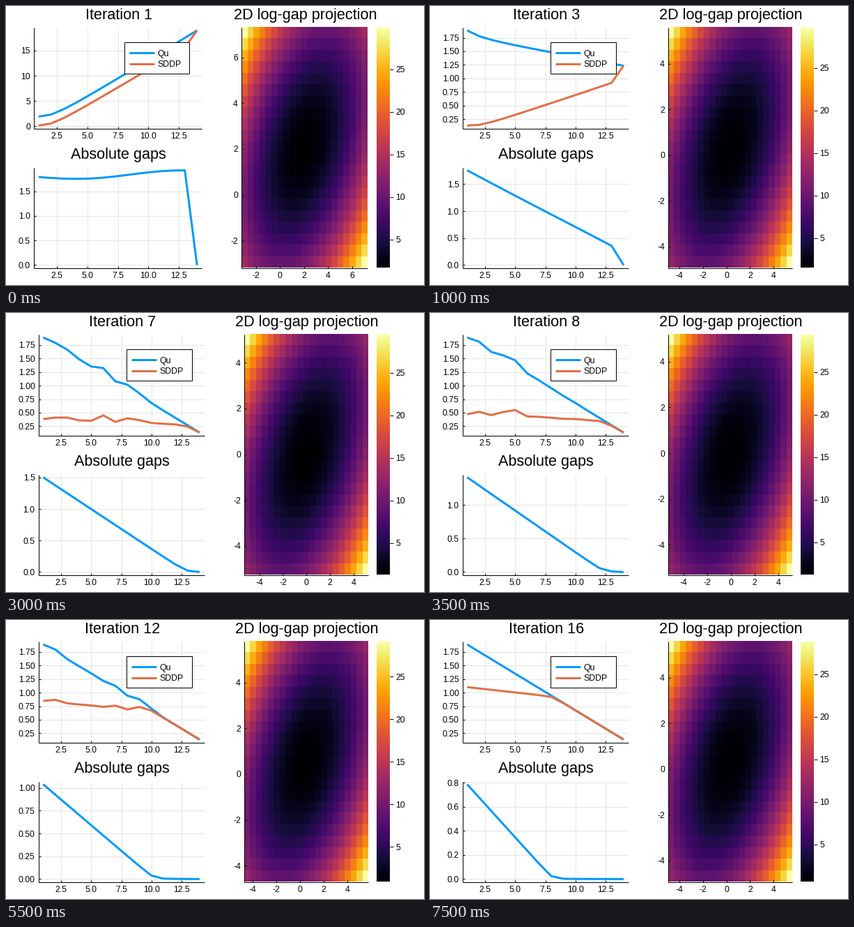
Animation, 600 px wide and 400 px high, one loop 8 s. Source, as a matplotlib script:

```python
import numpy as np
import matplotlib.pyplot as plt
from matplotlib.animation import FuncAnimation
from matplotlib.patches import Rectangle

W, H, DPI = 600, 400, 100
PX = 72 / DPI
BLUE, ORANGE, GRID = "#009af9", "#e26f46", "#e4e4e4"
plt.rcParams["font.family"] = "Liberation Sans"

ITERATIONS = 16
STAGES = np.arange(1, 15)
STEPS = STAGES - 1
BAR_SPAN = 28.2
GX, GY = np.meshgrid(np.linspace(-5, 5, 21), np.linspace(5, -5, 21))

fig = plt.figure(figsize=(W / DPI, H / DPI), dpi=DPI, facecolor="white")
ax = fig.add_axes([0, 0, 1, 1])


# --- data ---------------------------------------------------------------

def excess(it):
    """Early overshoot, gone after a few iterations."""
    return 1.62 * np.exp(-1.1 * (it - 1) ** 1.37)


def upper_curve(it):
    settled = 1.885 - 1.75 * STEPS / 13
    ramp = np.hypot(STEPS, 1.43) - 1.43
    bumps = np.random.default_rng(it).random(14) ** 3
    bumps *= np.sin(np.pi * np.clip(STEPS / 10, 0, 1))
    bumps *= 0.2 * np.sin(np.pi * np.clip((it - 3) / 13, 0, 1))
    return settled + excess(it) * ramp + bumps


def gap_curve(it):
    """Falls almost linearly to zero at a stage that moves left over time."""
    start = 0.75 + 0.52 * (1 + np.cos(np.pi * (it - 1) / 17))
    reach = 15.6 - 0.53 * it + 100 * excess(it) ** 2
    t = 1 - STEPS / reach
    drift = 0.0081 * STEPS - 0.037 * np.sin(2 * np.pi * STEPS / 15)
    gap = start * (t + np.hypot(t, 0.04)) / 2 + excess(it) * drift
    gap[-1] = 0
    return gap


def center(it):
    return np.interp(it, [1, 3, 7, 10, 12, 16], [2.05, 0.32, -0.02, -0.16, 0.54, 0.32])


def bowl(c):
    """Tilted quadratic bowl scaled to 0..1."""
    z = 0.42 * GX**2 + 0.36 * GY**2 - (0.337 - 0.013 * c) * GX * GY
    return z / z.max()


# --- drawing helpers ----------------------------------------------------

def line(x, y, color="black", width=1.0, z=3):
    ax.plot(x, y, color=color, lw=width * PX, zorder=z,
            solid_capstyle="butt", solid_joinstyle="round")


def text(x, y, s, size=12.2, ha="center"):
    ax.text(x, y, s, fontsize=size * PX, ha=ha, va="baseline", color="black", zorder=6)


def title(x, y, s):
    text(x, y, s, 21.6)


def image(data, x0, x1, y0, y1):
    ax.imshow(data, extent=(x0, x1, y1, y0), cmap="inferno", aspect="auto",
              interpolation="nearest", zorder=2)


def ticks(lo, hi, step):
    return np.arange(np.ceil(lo / step), np.floor(hi / step) + 1) * step


def labels(values, step):
    places = 0 if step % 1 == 0 else 2 if step == 0.25 else 1
    return [f"{v + 0.0:.{places}f}" for v in values]


def padded(data):
    lo, hi = np.min(data), np.max(data)
    pad = 0.03 * (hi - lo)
    return lo - pad, hi + pad


def top_step(hi):
    return 5 if hi > 15 else 2.5 if hi > 6 else 0.25


def gap_step(hi):
    return 0.5 if hi > 1.4 else 0.2 if hi > 1.2 else 0.25 if hi > 0.9 else 0.2


def frame(box, xlim, ylim, xstep, ystep, grid=True):
    """Axis lines, ticks and labels; returns the data-to-pixel maps."""
    x0, x1, y0, y1 = box

    def sx(v):
        return x0 + (v - xlim[0]) / (xlim[1] - xlim[0]) * (x1 - x0)

    def sy(v):
        return y1 - (v - ylim[0]) / (ylim[1] - ylim[0]) * (y1 - y0)

    xs, ys = ticks(*xlim, xstep), ticks(*ylim, ystep)
    for v, s in zip(xs, labels(xs, xstep)):
        if grid:
            line([sx(v)] * 2, [y0, y1], GRID, z=1)
        line([sx(v)] * 2, [y1 - 3, y1])
        text(sx(v), y1 + 14.6, s)
    for v, s in zip(ys, labels(ys, ystep)):
        if grid:
            line([x0, x1], [sy(v)] * 2, GRID, z=1)
        line([x0, x0 + 3], [sy(v)] * 2)
        text(x0 - 5, sy(v) + 4.5, s, ha="right")
    line([x0, x0], [y0, y1])
    line([x0, x1], [y1, y1])
    return sx, sy


def legend(x, y):
    ax.add_patch(Rectangle((x, y), 93.5, 45.5, fc="white", ec="black", lw=PX, zorder=5))
    for dy, color, name in ((15.5, BLUE, "Qu"), (31, ORANGE, "SDDP")):
        line([x + 7, x + 43], [y + dy] * 2, color, 3, z=6)
        text(x + 47.2, y + dy + 4.6, name, ha="left")


# --- panels -------------------------------------------------------------

def curves(it):
    upper, gap = upper_curve(it), gap_curve(it)
    lower = upper - gap
    ylim, glim = padded([upper, lower]), padded(gap)
    ystep, gstep = top_step(upper.max()), gap_step(gap.max())

    # Long tick labels push the panels to the right.
    names = labels(ticks(*ylim, ystep), ystep) + labels(ticks(*glim, gstep), gstep)
    wide = max(map(len, names)) > 3
    x0, x1 = (46.6, 284.6) if wide else (40, 281)
    xlim = padded(STAGES)

    sx, sy = frame((x0, x1, 31, 175.5), xlim, ylim, 2.5, ystep)
    line(sx(STAGES), sy(upper), BLUE, 3, z=4)
    line(sx(STAGES), sy(lower), ORANGE, 3, z=4)
    legend(x1 - 111.3, 51.8)

    sx, sy = frame((x0, x1, 231.5, 375.5), xlim, glim, 2.5, gstep)
    line(sx(STAGES), sy(gap), BLUE, 3, z=4)

    mid = (x0 + x1) / 2 + 1.2
    title(mid, 18.7, f"Iteration {it}")
    title(mid, 218.7, "Absolute gaps")
    return wide


def heatmap(it, wide):
    x0, x1 = (342, 520) if wide else (338, 519)
    y0, y1 = 31, 375.5
    c = center(it)
    lim = (c - 5.25, c + 5.25)
    image(bowl(c), x0, x1, y0, y1)
    frame((x0, x1, y0, y1), lim, lim, 2, 2, grid=False)
    title((x0 + x1) / 2 + 1, 18.7, "2D log-gap projection")


def colorbar(it):
    x0, x1, y0, y1 = 532, 551, 31, 375
    low = 1.77 - 0.07 * it
    image(np.linspace(1, 0, 256)[:, None], x0, x1, y0, y1)
    for v in range(5, 30, 5):
        y = y1 - (v - low) / BAR_SPAN * (y1 - y0)
        line([x1, x1 + 5], [y, y])
        text(x1 + 8, y + 4.3, str(v), ha="left")


def draw(i):
    ax.cla()
    it = i + 1
    wide = curves(it)
    heatmap(it, wide)
    colorbar(it)
    ax.set_xlim(0, W)
    ax.set_ylim(H, 0)
    ax.axis("off")
    return []


anim = FuncAnimation(fig, draw, frames=ITERATIONS, interval=500, init_func=lambda: [],
                     repeat=True, repeat_delay=0, blit=False)
plt.show()
```
